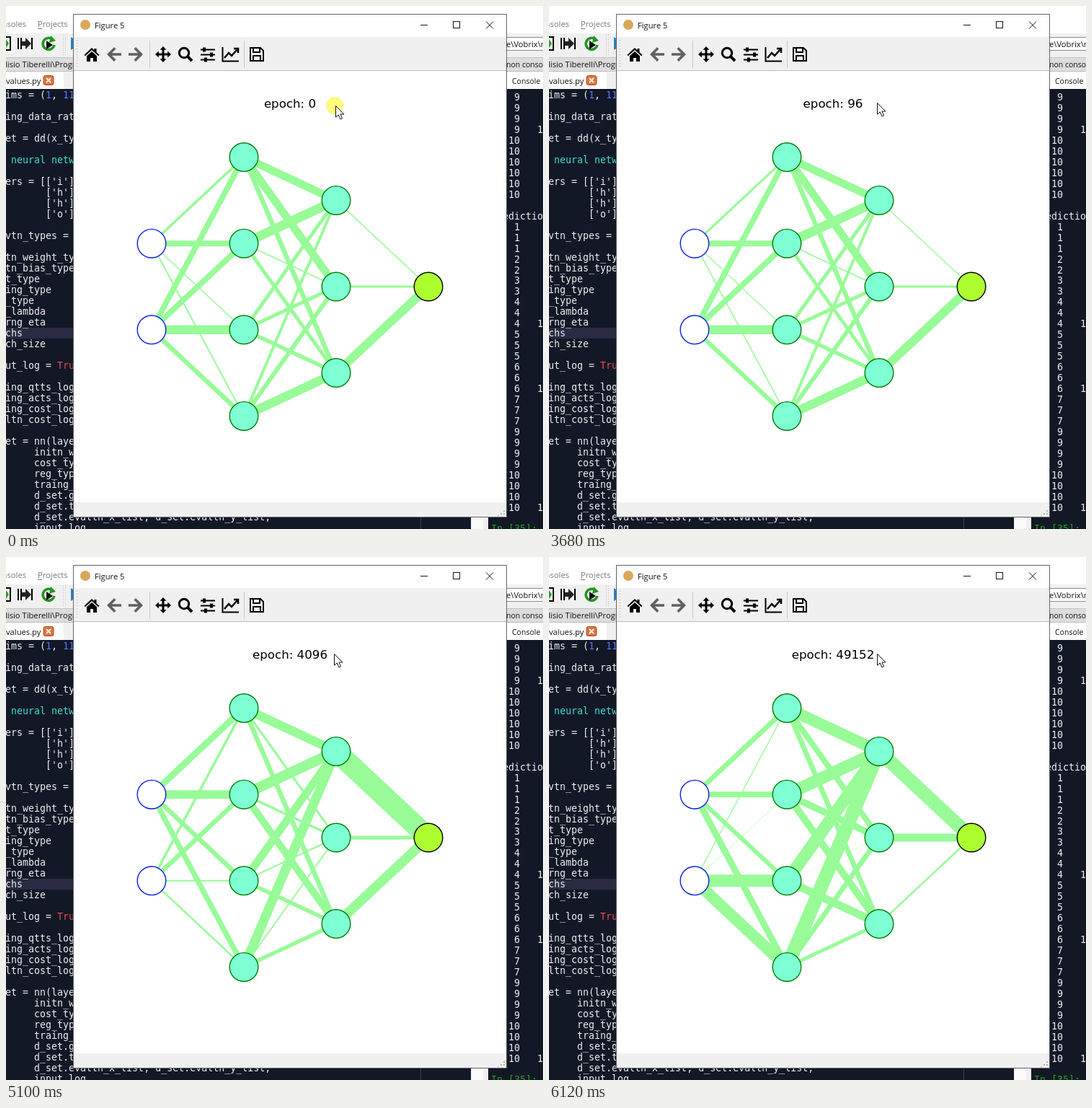
An HTML page for the animation above (7.53 s loop, 745 px wide and 725 px high).

```html
<!DOCTYPE html>
<html lang="en">
<head>
<meta charset="utf-8">
<title>Network training</title>
<style>
  html, body { margin: 0; width: 100%; height: 100%; overflow: hidden; background: #fff; }
  svg { display: block; width: 745px; height: 725px; }
  text { white-space: pre; }
  .ui { font: 11.2px "Open Sans", "Noto Sans", sans-serif; fill: #111; }
  .code { font: 13.3px "DejaVu Sans Mono", monospace; fill: #eee; }
  .epoch { font: 16.67px "DejaVu Sans", sans-serif; text-anchor: middle; }
  .line { fill: none; stroke: #000; stroke-width: 2; }
  #links line { stroke: #98fb98; }
  #nodes circle { stroke-width: 1.4; }
</style>
</head>
<body>
<svg viewBox="0 0 745 725">
  <!-- editor behind the window -->
  <rect width="745" height="725" fill="#fff"/>
  <rect y="38" width="745" height="77" fill="#f0f0f0"/>
  <rect y="71" width="745" height="20" fill="#dcdcdc"/>
  <path d="M0 71.5H745M0 90.5H745" stroke="#c4c4c4"/>
  <rect y="92" width="80" height="23" fill="#fff"/>
  <rect x="694" y="92" width="51" height="23" fill="#fff"/>
  <rect x="690" y="43.500" width="60" height="18" fill="#fff" stroke="#8a8a8a"/>
  <rect y="115" width="645" height="610" fill="#121826"/>
  <rect x="669" y="115" width="76" height="610" fill="#121826"/>
  <rect x="645" y="115" width="24" height="610" fill="#f0f0f0"/>
  <rect x="646" y="115" width="16" height="610" fill="#fafafa"/>
  <rect y="446" width="94" height="15" fill="#2a2a42"/>
  <path d="M575.500 708V725" stroke="#394052"/>
  <g class="ui">
    <text x="28" y="29" text-anchor="end" fill="#777">nsoles</text>
    <text x="44" y="29" fill="#777">Projects</text>
    <path d="M44 31.500h6" stroke="#777"/>
    <text x="-1" y="85">lisio Tiberelli\Progr</text>
    <text x="0" y="108">values.py</text>
    <text x="694" y="57">e\Vobrix\n</text>
    <text x="694" y="85" font-size="10.500">non console</text>
    <text x="702" y="108" font-size="10.500">Console</text>
  </g>
  <rect x="52" y="96.500" width="14" height="13" rx="2.500" fill="#e2733c" stroke="#a84c20"/>
  <path d="M56 100l6 6m0-6l-6 6" stroke="#fff" stroke-width="1.800"/>
  <g id="runIcons">
    <path d="M0 43h6v18H0" class="line"/>
    <path d="M0 46l4 6-4 6z" fill="#2a9d2a"/>
    <path d="M17 44v16M21 44v16" class="line" stroke-width="3"/>
    <path d="M22 49h5v-5l8 8-8 8v-5h-5z" fill="#222"/>
    <path d="M36 44v16" class="line"/>
    <path d="M64 46a8 8 0 1 0 3 8" fill="none" stroke="#229522" stroke-width="3.500"/>
    <path d="M62 41l7 7-9 3z" fill="#229522"/>
    <path d="M56 48l9 6-9 6z" fill="#111"/>
    <path d="M79.500 40v29M82.500 40v29" stroke="#bbb" stroke-dasharray="1 2"/>
    <path d="M90 43l14 9-14 9z" fill="#2a7fc0"/>
  </g>
  <g id="code" class="code"></g>
  <g id="console" class="code"></g>

  <!-- figure window -->
  <rect x="93.500" y="11.500" width="601" height="697" fill="#fefefe" stroke="#626469"/>
  <rect x="94" y="43" width="600" height="46" fill="#f0f0f0"/>
  <path d="M94 89.500h600" stroke="#bdbdbd"/>
  <rect x="94" y="688" width="600" height="20" fill="#f0f0f0"/>
  <path d="M691 699v8M687 703v4M683 706v1" stroke="#b5b5b5" stroke-width="2" stroke-dasharray="2 2"/>
  <circle cx="110" cy="26" r="7" fill="#d9a75a"/>
  <text x="123" y="31" class="ui">Figure 5</text>
  <path d="M575 26.500h10M666 21.500l10 10m0-10l-10 10" stroke="#111" fill="none"/>
  <rect x="620.500" y="21.500" width="9" height="9" fill="none" stroke="#111"/>
  <path d="M98.500 47v39" stroke="#aaa" stroke-dasharray="1 3"/>
  <path d="M199.500 48v38M330.500 48v38" stroke="#c8c8c8"/>
  <path d="M119 58l3.500 3.200V59h3v5l4 3.700-1.400 1.500L119 61l-9.100 8.200-1.400-1.500zM119 63l7 6.300V77h-5v-5h-4v5h-5v-7.700z"/>
  <path id="arrow" d="M150 57l2.500 2.500-5.700 5.700H160v3.600h-13.200l5.700 5.700L150 77l-10-10z" fill="#606060"/>
  <use href="#arrow" transform="matrix(-1 0 0 1 330 0)"/>
  <path d="M218 56l4.500 4.800h-3v4.700h4.700v-3L229 67l-4.800 4.500v-3h-4.700v4.700h3L218 78l-4.500-4.800h3v-4.700h-4.700v3L207 67l4.800-4.500v3h4.700v-4.700h-3z"/>
  <circle cx="247" cy="65" r="6.700" class="line" style="stroke-width:3"/>
  <path d="M252 70l6 6" class="line" style="stroke-width:4"/>
  <path d="M270 60.500h20M270 67.500h20M270 74.500h20" class="line"/>
  <path d="M275 57.500v6M285 64.500v6M277 71.500v6" class="line" style="stroke-width:4"/>
  <path d="M300.500 57v19.500H323" class="line"/>
  <path d="M303 72l6-7 4 4 8-9M316 59h6v6" class="line" style="stroke-width:2.500"/>
  <path d="M339 58h14l4 4v14h-18z" class="line"/>
  <path d="M343 58v6h9v-6M343 76v-7h10v7" class="line"/>

  <g id="links"></g>
  <g id="nodes"></g>
  <text id="epoch" class="epoch" x="394" y="141"></text>
  <circle id="halo" cx="456" cy="138" r="12" fill="#fdfb7c"/>
  <path id="cursor" d="M.5.5v15.800l3.700-3.400 2.700 6 2.600-1.100-2.600-5.800h5z" fill="#fff" stroke="#111"/>
</svg>
<script>
const LOOP = 7530;
const $ = id => document.getElementById(id);

function add(parent, tag, attrs, content = '') {
  const el = document.createElementNS('http://www.w3.org/2000/svg', tag);
  for (const key in attrs) el.setAttribute(key, attrs[key]);
  el.textContent = content;
  return parent.appendChild(el);
}

const source = `ims = (1, 11

ing_data_rat

et = dd(x_ty

 neural netw

ers = [['i']
       ['h']
       ['h']
       ['o']

vtn_types =

tn_weight_ty
tn_bias_type
t_type
ing_type
_type
_lambda
rng_eta
chs
ch_size

ut_log = Tru

ing_qtts_log
ing_acts_log
ing_cost_log
ltn_cost_log

et = nn(laye
     initn_w
     cost_ty
     reg_typ
     traing_
     d_set.g
     d_set.t
     d_set.evaltn_x_list, d_set.evaltn_y_list,
     input_log`;

function tint(part) {
  if (/^\d+$/.test(part)) return '#5577ff';
  if (part === 'Tru') return '#f0465a';
  if (part.includes('neural')) return '#42dcd2';
  return '#eee';
}
source.split('\n').forEach((line, i) => {
  const row = add($('code'), 'text', { x: -1, y: 128 + 15 * i });
  for (const part of line.split(/(\b\d+\b|Tru$)/)) add(row, 'tspan', { fill: tint(part) }, part);
});

// A plus marks rows whose second column is visible; a dash is a row without numbers.
const rows = '9 9 9 9+ 10 10 10 10 10 10 - - 1 1 1 2 2 3 3 4 4 4+ 5 5 5 6 6 6+ 7 7 7 9 9 9 9 10 10 10 10+';
rows.split(' ').forEach((cell, i) => {
  const y = 131 + 14.97 * i;
  if (cell === '-') return;
  add($('console'), 'text', { x: 713, y, 'text-anchor': 'end' }, parseInt(cell));
  if (cell.endsWith('+')) add($('console'), 'text', { x: 737, y }, '1');
});
add($('console'), 'text', { x: 689, y: 296 }, 'ediction');
add($('console'), 'text', { x: 673, y: 729, fill: '#1fa01f' }, 'In [35]:');

// Network layout
const column = (x, top, count) => Array.from({ length: count }, (_, i) => [x, top + 119.6 * i]);
const layers = [column(202, 329.2, 2), column(330, 209.6, 4), column(458, 269.4, 3), column(586, 389, 1)];
const fills = ['#fff', '#7fffd4', '#7fffd4', '#adff2f'];
const edges = ['#0a1ee0', '#008000', '#008000', '#000'];
layers.forEach((layer, i) => layer.forEach(([cx, cy]) =>
  add($('nodes'), 'circle', { cx, cy, r: 19.8, fill: fills[i], stroke: edges[i] })));

// Link widths at the key epochs, one row per link, ordered by start node then end node
const keyEpochs = [0, 448, 4096, 20480, 49152];
const widths = [
  [3.5, 2, 9, 5.5, 7], [8, 7.5, 12, 7, 8], [1.5, .3, 6.5, 4, 6], [2, 0, 7.5, 1.5, 9],
  [8, 7.5, 3.5, .8, 1.4], [8, 8, 6.5, 0, .6], [12.5, 12.5, 2, 17, 17], [6.5, 5.5, 2.5, 4.5, 16],
  [11, 10.5, 12.5, 16, 16], [11, 11, 3, 5.5, 8], [6.5, 6, 6.5, 7, 7],
  [13, 13.5, 14.5, 17, 17], [1.5, 1.5, 3.5, 5, 9.5], [5, 4, 10, 10.5, 10],
  [5, 5, 11, 17, 17], [5, 5, 2, 3, .3], [5.5, 5, 5.5, 11.5, 11],
  [4, 4, 13, 19, 19], [6, 6, 1.8, 5, 7], [12.5, 12, 5.5, 5.5, 5],
  [1.6, .3, 29, 19, 19], [2.8, 2.6, 5, 11, 11], [12, 13, 13.5, 3.5, 2.5]
];
const links = [];
for (let i = 0; i < 3; i++)
  for (const [x1, y1] of layers[i])
    for (const [x2, y2] of layers[i + 1]) links.push(add($('links'), 'line', { x1, y1, x2, y2 }));

// [start time, value] steps
const epochs = [
  [0, 0], [1220, 1], [1440, 2], [2050, 4], [2240, 8], [2860, 12], [3060, 20], [3260, 32],
  [3480, 56], [3680, 96], [3880, 160], [4080, 256], [4280, 448], [4480, 768], [4680, 1280],
  [4900, 2304], [5100, 4096], [5300, 7168], [5500, 12288], [5700, 20480], [5920, 32768], [6120, 49152]
];
const cursorSteps = [[0, '457 138'], [220, '457 137'], [420, '456 135'], [620, '455 134']];
const valueAt = (steps, t) => steps.findLast(step => step[0] <= t)[1];

function widthAt(row, epoch) {
  const k = Math.min(keyEpochs.findLastIndex(key => key <= epoch), keyEpochs.length - 2);
  const f = (epoch - keyEpochs[k]) / (keyEpochs[k + 1] - keyEpochs[k]);
  return row[k] + (row[k + 1] - row[k]) * f;
}

function render(t) {
  const epoch = valueAt(epochs, t);
  $('epoch').textContent = 'epoch: ' + epoch;
  links.forEach((link, i) => link.setAttribute('stroke-width', widthAt(widths[i], epoch)));
  $('halo').setAttribute('visibility', t < 220 ? 'visible' : 'hidden');
  $('cursor').setAttribute('transform', `translate(${valueAt(cursorSteps, t)})`);
}

const start = performance.now();
function frame() {
  render((performance.now() - start) % LOOP);
  requestAnimationFrame(frame);
}
frame();
</script>
</body>
</html>
```
